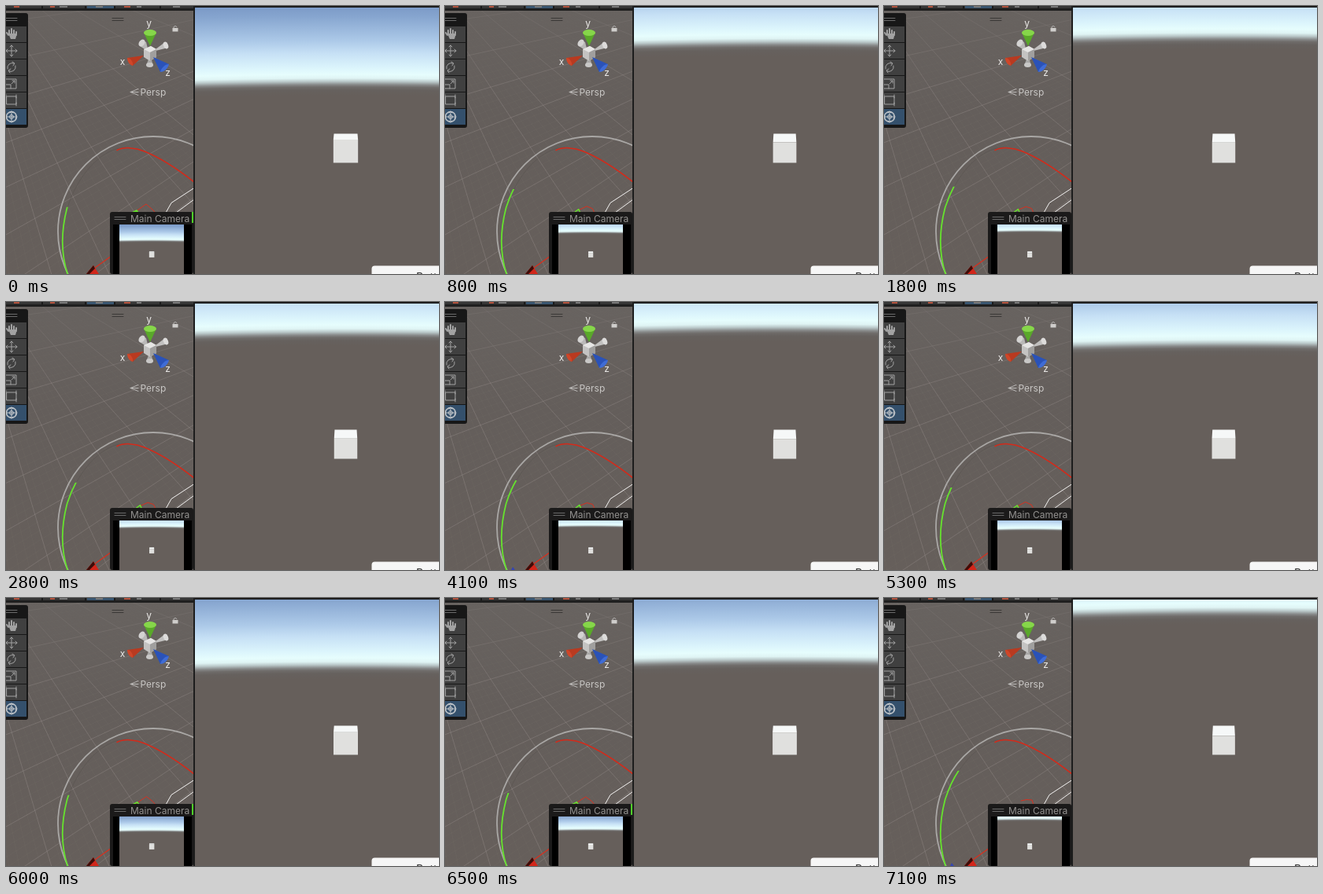
Write an HTML page that moves like this. It is 550 px wide and 341 px high and loops after 7.2 s.

```html
<!DOCTYPE html>
<html lang="en">
<head>
<meta charset="utf-8">
<title>Camera orbit</title>
<style>
html, body { margin: 0; width: 100%; height: 100%; overflow: hidden; background: #665f5b; }
svg { display: block; width: 550px; height: 341px; }
text { font-family: Inter, Roboto, sans-serif; font-size: 12px; }
.line { fill: none; stroke-linecap: round; stroke-linejoin: round; }
</style>
</head>
<body>
<svg viewBox="0 0 550 341">
  <defs>
    <radialGradient id="sky" gradientUnits="userSpaceOnUse" cx="435" r="8110" fr="7990"></radialGradient>
    <linearGradient id="floor" x2="0" y2="1">
      <stop stop-color="#686360"/><stop offset=".4" stop-color="#645e5b"/><stop offset="1" stop-color="#665f5b"/>
    </linearGradient>
    <linearGradient id="fade" x2="0" y2="1">
      <stop stop-color="#fff" stop-opacity=".35"/><stop offset=".35" stop-color="#fff"/>
    </linearGradient>
    <mask id="haze"><rect width="238" height="341" fill="url(#fade)"/></mask>
    <clipPath id="left"><rect y="4" width="238" height="337"/></clipPath>
    <clipPath id="right"><rect x="240" y="2" width="310" height="339"/></clipPath>
    <clipPath id="mini"><rect x="144" y="278" width="82" height="63"/></clipPath>
    <clipPath id="sweep"><rect id="sweepBox" width="238" height="200"/></clipPath>
  </defs>

  <g clip-path="url(#left)">
    <rect width="238" height="341" fill="url(#floor)"/>
    <g id="grid" class="line" stroke="#a09a96" mask="url(#haze)"></g>
    <circle cx="187" cy="287" r="121" class="line" stroke="#a9a7a5" stroke-width="1.800"/>
    <path class="line" d="M78 257C90 216 122 180 152 180" stroke="#55504c" stroke-opacity=".45"/>
    <path class="line" d="M141 183.500C150 179 164 180 176 185C198 194 220 209 239 224" stroke="#d42a1a" stroke-width="1.500"/>
    <path class="line" d="M78.500 342C70.500 318 69.500 288 77.500 257C81.500 244 88 229 98 215" stroke="#66e22e" stroke-width="1.800" clip-path="url(#sweep)"/>
    <path class="line" d="M203 263L210 250.500L239 231.500M216 263L239 246" stroke="#f4f3f2"/>
    <path id="redTip" class="line" stroke="#d8301f"/>
    <path id="greenTip" class="line" stroke="#66e22e" stroke-width="1.500"/>
    <path class="line" d="M113 333L134 318" stroke="#d8301f" stroke-width="1.300"/>
    <path d="M102 341L111 330L118 341Z" fill="#d2261a"/>
    <path d="M102 341L111 330L113 334L106 341Z" fill="#3d0d09"/>
    <path id="blueTip" d="M84 341L86 337L89 341Z" fill="#3546b0"/>
  </g>

  <path class="line" d="M135 15.500H149M135 18.500H149" stroke="#3a3836"/>
  <g id="gizmo">
    <path d="M181 58L170 51L174 44L178 46Z" fill="#b9b8b7"/>
    <ellipse cx="172.500" cy="47" rx="3.500" ry="5" fill="#d4d3d2" transform="rotate(35 172.500 47)"/>
    <path d="M186 58L202 46L206 53Z" fill="#c1c0bf"/>
    <ellipse cx="203" cy="50" rx="3" ry="4.500" fill="#dddcdb" transform="rotate(-22 203 50)"/>
    <path d="M183 62L178 76H187Z" fill="#a9a8a7"/>
    <ellipse cx="182.500" cy="75" rx="4.500" ry="3" fill="#c9c8c7"/>
    <path d="M175 55L184 51L191 55V65L183 70L175 65Z" fill="#c4c3c2"/>
    <path d="M175 55L184 51L191 55L183 59Z" fill="#e6e5e4"/>
    <path d="M183 59L191 55V65L183 70Z" fill="#a09f9e"/>
    <path d="M175 34L183 51L191 34Z" fill="#5aa82a"/>
    <ellipse cx="183" cy="34" rx="8" ry="4" fill="#86d64a"/>
    <path d="M154 66L175 63L161 76Z" fill="#b93a20"/>
    <path d="M154 66C158 66 162 71 161 76C157 75 154 71 154 66Z" fill="#cf4629"/>
    <path d="M187 65L207 74L196 84Z" fill="#2a52b8"/>
    <path d="M207 74C206 79 201 84 196 84C197 79 202 74 207 74Z" fill="#3f6cd6"/>
    <g fill="#eceae8" text-anchor="middle">
      <text x="181.500" y="26">y</text><text x="148" y="75">x</text><text x="205.500" y="89">z</text>
    </g>
    <rect x="211.500" y="28" width="7" height="4.500" fill="#cfcdcb"/>
    <path class="line" d="M213 28V26.500Q215 24 217 26.500" stroke="#b5b3b1"/>
    <path class="line" d="M168 105.500L158 109.500L168 113.500M158 109.500H168" stroke="#bab8b6"/>
    <text x="170.500" y="114" fill="#c9c7c5">Persp</text>
  </g>

  <path d="M0 9H25Q28 9 28 12V152Q28 155 25 155H0Z" fill="#171717"/>
  <path class="line" d="M0 15.500H14M0 18.500H14" stroke="#6a6a6a"/>
  <g id="tools"></g>
  <g class="line" stroke="#a2a2a2">
    <path d="M3 37L1 34M4 36V31M7 35V29M10 36V31M13 37V33" stroke-width="2"/>
    <path d="M3 35H14L12 42H6Z" fill="#a2a2a2" stroke="none"/>
    <path d="M0 57H14M7 50V64M5 52L7 50L9 52M5 62L7 64L9 62M12 55L14 57L12 59M2 55L0 57L2 59"/>
    <path d="M2 80A6 6 0 0 1 10 73M12 76A6 6 0 0 1 4 83M8 71L11 73L9 76M6 80L3 82L5 85"/>
    <path d="M0 93H13V105H0M0 100H6V105M7 99L11 95M8 95H11V98"/>
    <path d="M1 115H13V125H1ZM0 113V117M13 113V117M13 123V127"/>
    <g stroke="#c4c8cc">
      <path d="M0 141H14M7 134V148M5 136L7 134L9 136M5 146L7 148L9 146M12 139L14 141L12 143"/>
      <circle cx="7" cy="141" r="6.500" stroke-width="1.400"/>
      <circle cx="7" cy="141" r="2.500"/>
    </g>
  </g>

  <rect x="132" y="262" width="106" height="79" rx="3" fill="#1b1a1a"/>
  <rect x="136" y="278" width="100" height="63" fill="#000"/>
  <path class="line" d="M138 268.500H152M138 271.500H152" stroke="#6a6a6a"/>
  <text x="158" y="275" fill="#93918f">Main Camera</text>
  <path id="edge" d="M237 262V276" stroke="#4fd02a" stroke-width="2"/>

  <rect width="550" height="3" fill="#363636"/>
  <path d="M0 4.500H238" stroke="#1f1f1f" stroke-width="3"/>
  <path d="M46 0V3M101 0V3M138 0V3M196 0V3" stroke="#191919" stroke-width="2"/>
  <rect x="103" width="34" height="3" fill="#39556f"/>
  <path d="M10 1H17M56 1H62M150 1H158" stroke="#b0513c" stroke-width="2"/>
  <path d="M68 1H78M114 1H123M166 1H172M212 1H221" stroke="#777" stroke-width="2"/>
  <path d="M239 0V341M238 1H550" stroke="#1d1d1d" stroke-width="2"/>

  <g clip-path="url(#right)">
    <g id="view">
      <rect x="230" width="410" height="345" fill="url(#sky)"/>
      <path id="front" fill="#e0e0de"/>
      <path id="top" fill="#f6f8f8"/>
    </g>
    <rect x="464.500" y="330.500" width="100" height="24" rx="4" fill="#f6f6f6"/>
    <text x="521" y="349.500" style="font-size:14px" fill="#333">Button</text>
  </g>
  <g clip-path="url(#mini)"><use href="#view" transform="translate(94.500 278) scale(.21)"/></g>
</svg>
<script>
const LOOP = 7200, STEP = 100, RADIUS = 8000;
const $ = id => document.getElementById(id);
const add = (parent, tag, attrs) => {
  const el = document.createElementNS('http://www.w3.org/2000/svg', tag);
  for (const k in attrs) el.setAttribute(k, attrs[k]);
  return parent.appendChild(el);
};

// height above the horizon, colour
const skyStops = [
  [-10, '#665f5b'], [-3, '#66615e'], [1, '#6f6c6a'], [4, '#878989'], [8, '#b9c7c8'],
  [12, '#dff4f4'], [17, '#e6fdfd'], [25, '#dcf5fc'], [44, '#c6e0f5'], [60, '#acc9e8'],
  [91, '#86a5cf'], [108, '#7896c4']
];
for (const [d, color] of skyStops) add($('sky'), 'stop', { offset: (d + 10) / 120, 'stop-color': color });

for (let i = 0; i < 6; i++)
  add($('tools'), 'rect', { y: 26 + i * 21, width: 26, height: 20, fill: i === 5 ? '#34506c' : '#404040' });

// two fans of floor lines, every fifth one stronger
function fan(x, y, from, to, count) {
  for (let i = 0; i <= count; i++) {
    const a = (from + (to - from) * i / count) * Math.PI / 180;
    add($('grid'), 'line', {
      x1: x, y1: y, x2: x + 1100 * Math.cos(a), y2: y + 1100 * Math.sin(a),
      'stroke-opacity': i % 5 ? .09 : .34, 'stroke-width': i % 5 ? .7 : 1
    });
  }
}
fan(-70, -90, 14, 82, 40);
fan(640, -70, 142, 172, 35);

// time, horizon height
const keys = [
  [0, 104], [400, 76], [900, 51], [1700, 46], [2800, 46], [3500, 42], [4100, 40],
  [4800, 47], [5300, 60], [6000, 93], [6300, 97], [6700, 67], [7100, 24]
];
const slope = i => (keys[i + 1][1] - keys[i][1]) / (keys[i + 1][0] - keys[i][0]);
const tangents = keys.map((_, i) => {
  if (i === 0) return slope(0);
  if (i === keys.length - 1) return slope(i - 1);
  const a = slope(i - 1), b = slope(i);
  return a * b > 0 ? 2 * a * b / (a + b) : 0;
});

function horizonAt(t) {
  const i = Math.max(1, keys.findIndex(k => t <= k[0])) - 1;
  const [t0, h0] = keys[i], [t1, h1] = keys[i + 1];
  const w = t1 - t0, u = (t - t0) / w, v = 1 - u;
  return v * v * (1 + 2 * u) * h0 + u * u * (3 - 2 * u) * h1
    + w * u * v * (v * tangents[i] - u * tangents[i + 1]);
}

function draw(h) {
  const l = 417.5 - .016 * h, r = 445.5 + .016 * h, edge = 177 - .068 * h;
  $('sky').setAttribute('cy', h + RADIUS);
  $('sky').setAttribute('fy', h + RADIUS);
  $('front').setAttribute('d', `M${l} ${edge}H${r}V199.500H${l}Z`);
  $('top').setAttribute('d', `M${l + .7} 162.500H${r - .7}L${r} ${edge}H${l}Z`);
  $('sweepBox').setAttribute('y', 209 + .45 * h);

  const k = Math.min(1, Math.max(0, (104 - h) / 80));
  $('redTip').setAttribute('d', `M${164 + 10 * k} ${262 - 4 * k}L${178 + 3 * k} ${252 + 4.5 * k}L${186 + 2 * k} ${259 - 2 * k}L190 263`);
  $('greenTip').setAttribute('d', `M${160 + 6 * k} 263L${166 + 6 * k} ${260 - 2 * k}L${168 + 6 * k} 263`);
  $('greenTip').setAttribute('opacity', h < 30 ? 0 : 1);
  $('blueTip').setAttribute('opacity', h < 43 ? 1 : 0);
  $('edge').setAttribute('opacity', h > 85 ? 1 : 0);
}

function tick() {
  const t = performance.now() % LOOP;
  draw(horizonAt(Math.floor(t / STEP) * STEP));
  requestAnimationFrame(tick);
}
tick();
</script>
</body>
</html>
```
